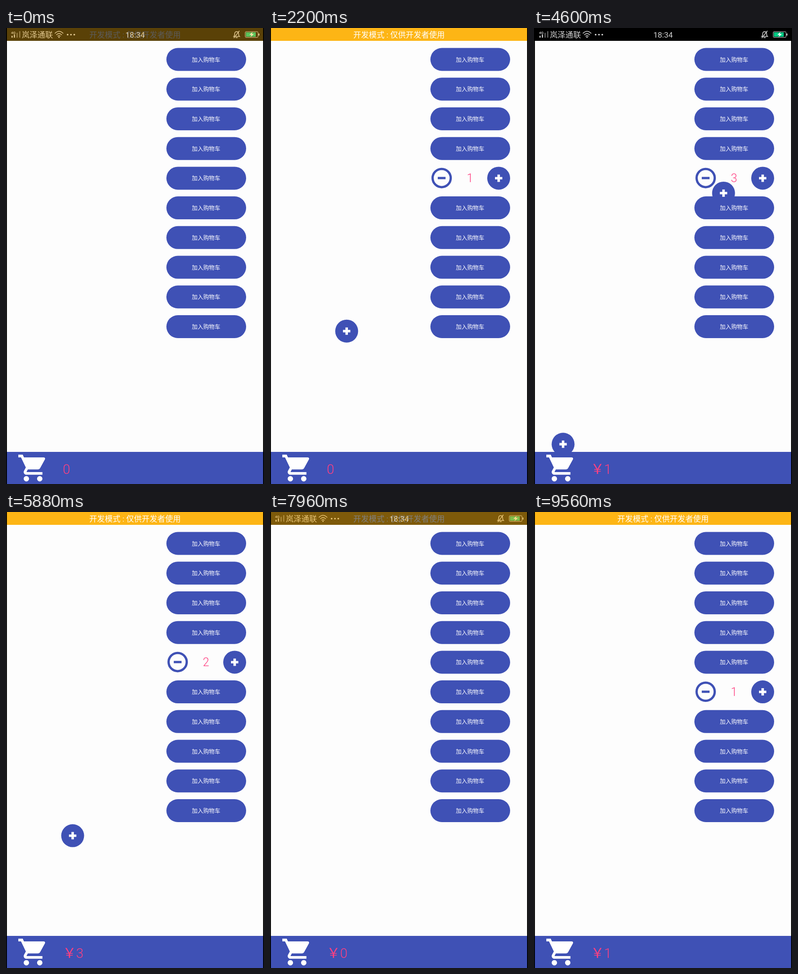
These frames come from a looping animation (563 px wide and 994 px high, 9.6 s). An HTML page:

```html
<!DOCTYPE html>
<html lang="zh-CN">
<head>
<meta charset="utf-8">
<title>加入购物车</title>
<style>
  html, body { margin: 0; width: 100%; height: 100%; overflow: hidden; background: #000; }
  svg { display: block; width: 563px; height: 994px; }
  text { font-family: Roboto, "Noto Sans CJK SC", "Noto Sans CJK", sans-serif; }
  .mid { text-anchor: middle; }
  .label { font-size: 12.4px; fill: #fff; }
  .count { font-size: 25px; font-weight: 300; fill: #ff4081; }
  .price { font-size: 29px; font-weight: 300; fill: #ff4081; }
  .status { font-size: 17px; fill: #d4d4d4; }
  .line { fill: none; stroke: #d4d4d4; stroke-width: 1.5; stroke-linecap: round; }
</style>
</head>
<body>
<svg viewBox="0 0 563 994">
  <defs>
    <g id="plus">
      <circle r="25" fill="#3f51b5"/>
      <path d="M-8 0H8M0 -8V8" stroke="#fff" stroke-width="5.4"/>
    </g>
    <g id="minus">
      <circle r="19.8" fill="#fdfdfd" stroke="#3f51b5" stroke-width="5"/>
      <path d="M-8.5 0H8.5" stroke="#3f51b5" stroke-width="5"/>
    </g>
  </defs>

  <rect width="563" height="994"/>
  <rect x="2" y="28" width="559" height="896" fill="#fdfdfd"/>

  <g id="statusBar">
    <text x="11" y="12.5" font-size="8" font-weight="500" fill="#d4d4d4">4G</text>
    <path d="M13.2 21V17M18.4 21V14" stroke="#d4d4d4" stroke-width="2.4"/>
    <path d="M24.2 21V10.5M30 21V7" stroke="#666" stroke-width="2.4"/>
    <text class="status" x="34.5" y="20.5">岚泽通联</text>
    <path class="line" d="M107 11.5Q115.500 3 124.500 11.500M110 14.800Q115.700 9.400 121.500 14.800M112.800 17.800Q115.700 15.200 118.700 17.800"/>
    <circle cx="115.700" cy="20" r="1.500" fill="#d4d4d4"/>
    <g fill="#d4d4d4">
      <circle cx="134.500" cy="14.500" r="1.800"/>
      <circle cx="141.800" cy="14.500" r="1.800"/>
      <circle cx="149" cy="14.500" r="1.800"/>
    </g>
    <text class="status mid" x="281.700" y="21">18:34</text>
    <path class="line" stroke-width="1.200" d="M497 18.500Q499 17 499 13Q499 8 503.300 8Q507.600 8 507.600 13Q507.600 17 509.600 18.500ZM501.500 21H505M497.500 21.500L509 6.500"/>
    <rect x="522" y="8" width="28" height="12.500" rx="2" fill="none" stroke="#d4d4d4"/>
    <rect x="523.500" y="9.500" width="21.500" height="9.500" fill="#00c983"/>
    <rect x="551" y="12" width="2" height="4.500" fill="#d4d4d4"/>
    <path d="M538 8.500L531 15H535.500L533.500 20L541 13H536.500Z" fill="#fff"/>
  </g>
  <g id="devBar">
    <rect x="2" width="559" height="28" fill="#fdb515"/>
    <text class="mid" x="281.500" y="21" font-size="17" fill="#fff">开发模式 : 仅供开发者使用</text>
  </g>

  <g id="rows"></g>

  <rect x="2" y="924" width="559" height="70" fill="#3f51b5"/>
  <path transform="translate(24 924.200) scale(2.920)" fill="#fff" d="M7 18c-1.100 0-1.990.9-1.990 2S5.900 22 7 22s2-.9 2-2-.9-2-2-2zM1 2v2h2l3.600 7.590-1.350 2.450c-.16.28-.25.61-.25.96 0 1.100.9 2 2 2h12v-2H7.420c-.14 0-.25-.11-.25-.25l.03-.12.9-1.630h7.450c.75 0 1.410-.41 1.750-1.030l3.580-6.490c.08-.14.12-.31.12-.48 0-.55-.45-1-1-1H5.210l-.94-2H1zm16 16c-1.100 0-1.990.9-1.990 2s.89 2 1.990 2 2-.9 2-2-.9-2-2-2z"/>
  <text id="price" class="price" x="124" y="972">0</text>
  <g id="balls"></g>
</svg>
<script>
const LOOP = 9600, FLIGHT = 1000, STEP = 350;
const WIDTH = 174, SIZE = 50;
const rowTop = i => 43.5 + i * 64.72;

// [time, value] steps
const devFade = [[0, .357], [200, 0], [720, 0], [1280, 1], [3640, 1], [4200, 0],
                 [4720, 0], [5280, 1], [7680, 1], [8240, 0], [8760, 0], [9320, 1]];
const counts = {
  4: [[0, 1], [3711, 2], [4329, 3], [5202, 2], [6080, 1], [6900, 0]],
  5: [[0, 1]]
};
const prices = [[0, '0'], [2560, '￥1'], [4711, '￥2'], [5329, '￥3'],
                [6202, '￥2'], [7080, '￥1'], [7900, '￥0'], [9560, '￥1']];
// [row, launch time]
const flights = [[4, 1560], [4, 3711], [4, 4329], [4, 5202], [4, 6080], [4, 6900], [5, 8560]];
const taps = { 4: { open: 1212, close: 6900 }, 5: { open: 8210, close: Infinity } };

const $ = id => document.getElementById(id);
const clamp = v => Math.min(1, Math.max(0, v));
const ease = p => (1 - Math.cos(Math.PI * clamp(p))) / 2;
const ramp = (t, start) => ease((t - start) / STEP);

function add(parent, tag, attrs, text = '') {
  const el = document.createElementNS('http://www.w3.org/2000/svg', tag);
  set(el, attrs);
  el.textContent = text;
  return parent.appendChild(el);
}

function set(el, attrs) {
  for (const key in attrs) el.setAttribute(key, attrs[key]);
}

function stepAt(table, t) {
  return table.filter(s => s[0] <= t).pop()[1];
}

function lerpAt(table, t) {
  const next = table.findIndex(s => s[0] > t);
  if (next < 0) return table[table.length - 1][1];
  const [t0, v0] = table[next - 1], [t1, v1] = table[next];
  return v0 + (v1 - v0) * (t - t0) / (t1 - t0);
}

const rows = Array.from({ length: 10 }, (_, i) => {
  const g = add($('rows'), 'g', { transform: `translate(350 ${rowTop(i)})` });
  const hint = add(g, 'rect', { width: WIDTH, height: SIZE, rx: 25, fill: '#3f51b5' });
  const label = add(g, 'text', { class: 'label mid', x: 86.6, y: 30 }, '加入购物车');
  if (!taps[i]) return null;
  return {
    hint, label,
    minus: add(g, 'use', { href: '#minus' }),
    count: add(g, 'text', { class: 'count mid', y: 9 }),
    plus: add(g, 'use', { href: '#plus', x: 149, y: 25 })
  };
});

const balls = flights.map(() => add($('balls'), 'use', { href: '#plus' }));

function drawRow(i, t) {
  const { hint, label, minus, count, plus } = rows[i];
  const { open, close } = taps[i];
  const closing = t >= close;
  const fold = closing ? 1 - ramp(t, close + STEP) : ramp(t, open);
  const roll = closing ? 1 - ramp(t, close) : ramp(t, open + STEP);
  const left = fold * (WIDTH - SIZE), back = 1 - roll;

  set(hint, { x: left, width: WIDTH - left, visibility: fold < 1 ? 'visible' : 'hidden' });
  set(label, { visibility: fold > 0 ? 'hidden' : 'visible' });
  set(plus, { visibility: fold < 1 ? 'hidden' : 'visible' });
  set(minus, { opacity: roll, transform: `translate(${24.6 + back * 124} 24.7) rotate(${back * 360})` });
  set(count, { opacity: roll, transform: `translate(${86.5 + back * 62} 25) rotate(${back * 360})` });
  count.textContent = stepAt(counts[i], t);
}

function drawBall(ball, [row, launch], t) {
  const p = (t - launch) / FLIGHT;
  const u = ease(p), a = 2 * u * (1 - u), b = u * u;
  const y0 = rowTop(row) + 25;
  const x = 499 - 447 * (a * .568 + b);
  const y = y0 + (940 - y0) * (a * .083 + b);
  set(ball, {
    visibility: p >= 0 && p < 1 ? 'visible' : 'hidden',
    transform: `translate(${x} ${y})`
  });
}

function draw(t) {
  set($('devBar'), { opacity: lerpAt(devFade, t) });
  $('price').textContent = stepAt(prices, t);
  Object.keys(taps).forEach(i => drawRow(i, t));
  balls.forEach((ball, i) => drawBall(ball, flights[i], t));
}

const start = performance.now();
function tick() {
  draw((performance.now() - start) % LOOP);
  requestAnimationFrame(tick);
}
tick();
</script>
</body>
</html>
```
